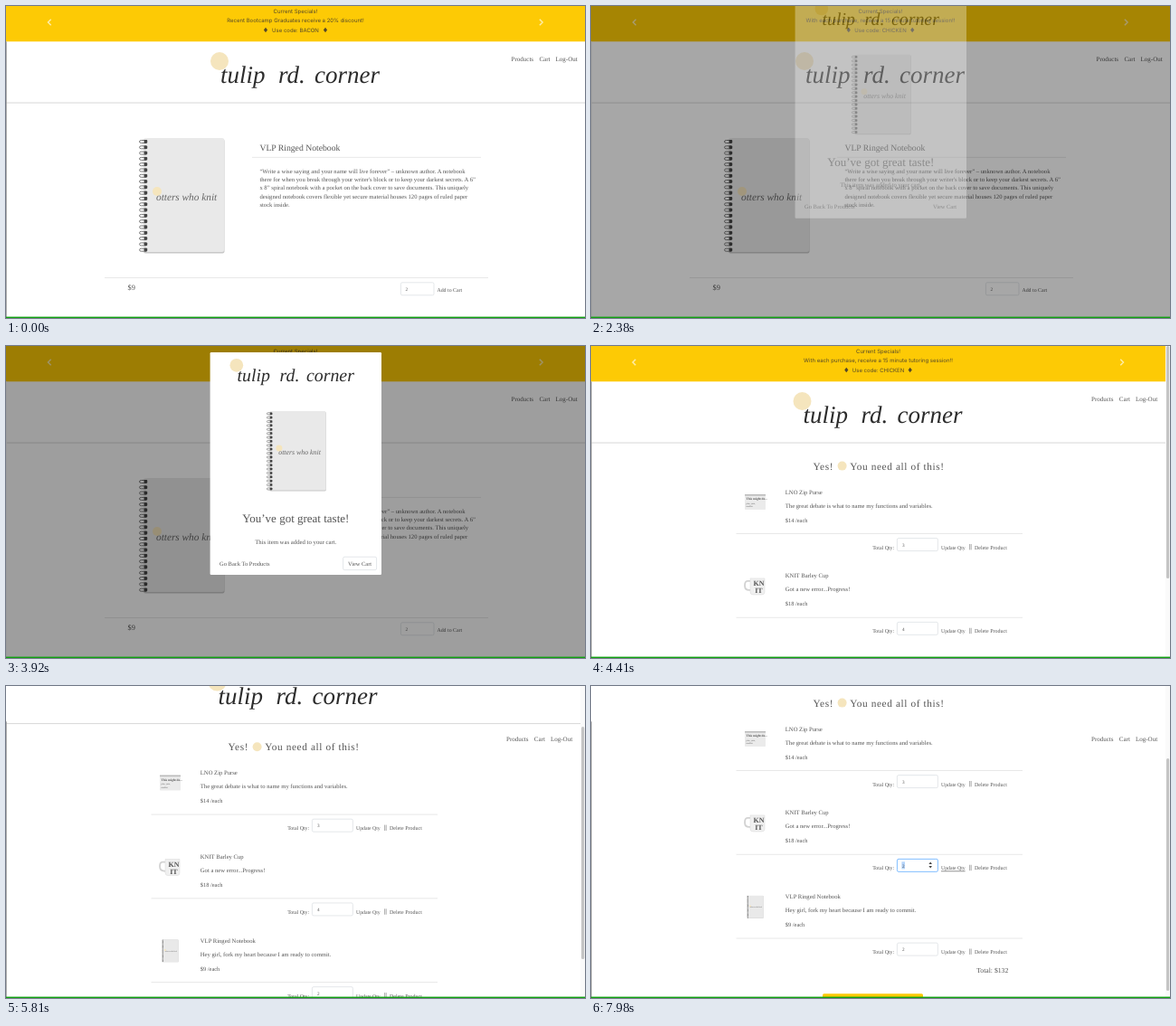
Write an HTML page that moves like this. It is 640 by 345 pixels and loops after 8000 ms.

```html
<!DOCTYPE html>
<html lang="en">
<head>
<meta charset="utf-8">
<title>Shop walkthrough</title>
<style>
  html, body { margin: 0; width: 100%; height: 100%; overflow: hidden; background: #fff; }
  svg { display: block; width: 100vw; height: 100vh; }
  text { font-family: "Liberation Serif", serif; fill: #555; text-rendering: geometricPrecision; white-space: pre; }
  .sans text { font-family: Inter, sans-serif; font-size: 6px; fill: #54482a; text-anchor: middle; }
  .script { font-style: italic; fill: #2c2c2c; }
  .soft { font-style: italic; fill: #666; }
  .mid { text-anchor: middle; }
  .rule { stroke: #e2e2e2; stroke-width: .8; }
  .field { fill: #fff; stroke: #d9dde1; stroke-width: .7; }
  .focus { stroke: #80bdff; stroke-width: 1; }
  .chevron { fill: none; stroke: #fff; stroke-width: 1.5; opacity: .65; }
</style>
</head>
<body>
<svg id="stage" viewBox="0 0 640 345" preserveAspectRatio="none"></svg>
<script>
const LOOP = 8000;
const GOLD = "#fdca05";
const CREST = "#f5e5bd";

const clamp = v => Math.max(0, Math.min(1, v));
const span = (t, from, to) => clamp((t - from) / (to - from));
const smooth = p => p * p * (3 - 2 * p);
const easeOut = p => 1 - (1 - p) ** 2;

const label = (x, y, size, str, extra = "") =>
  `<text x="${x}" y="${y}" font-size="${size}" ${extra}>${str}</text>`;
const rule = (x1, x2, y) => `<line class="rule" x1="${x1}" x2="${x2}" y1="${y}" y2="${y}"/>`;
const underline = (id, x1, x2, y) =>
  `<line id="${id}" x1="${x1}" x2="${x2}" y1="${y}" y2="${y}" stroke="#444" stroke-width=".6"/>`;
const field = (x, y, w, h, id = "") =>
  `<rect ${id && `id="${id}"`} class="field" x="${x}" y="${y}" width="${w}" height="${h}" rx="1.6"/>`;
const spinner = (id, x, y) =>
  `<path id="${id}" d="M${x - 1.8} ${y - 1}l1.8-2.6 1.8 2.6zM${x - 1.8} ${y + 1}l1.8 2.6 1.8-2.6z" fill="#444"/>`;
const group = (x, y, scale, body) =>
  `<g transform="translate(${x} ${y}) scale(${scale})">${body}</g>`;

// Shop name with its round emblem, laid out from the emblem's corner
const shopName = () => `
  <circle cx="12" cy="12" r="10" fill="${CREST}"/>
  ${label(13, 36, 27, "tulip", 'class="script"')}
  ${label(77, 36, 27, "rd.", 'class="script"')}
  ${label(117, 36, 27, "corner", 'class="script"')}`;

function notebook() {
  let rings = "";
  for (let i = 0; i < 20; i++) {
    const y = 2.5 + i * 6.3;
    rings += `<path d="M8 ${y}H2.5q-2 0-2 1.5t2 1.5H8" fill="none" stroke="#777" stroke-width="1"/>
      <rect x="5.6" y="${y - .4}" width="3.6" height="3.6" rx=".8" fill="#444"/>`;
  }
  return `
    <rect x="5" y="1" width="89.5" height="126.5" rx="2" fill="#c8c8c8"/>
    <rect x="5" width="89" height="126" rx="2" fill="#e9e9e9"/>
    ${rings}
    <circle cx="20" cy="59" r="5" fill="${CREST}"/>
    ${label(19, 69, 11.3, "otters who knit", 'class="soft"')}`;
}

const pouch = () => `
  <rect width="23" height="17" rx=".8" fill="#ebebeb"/>
  <rect width="23" height="1.6" fill="#bbb"/>
  ${label(1.5, 6, 3.5, "This might do...", 'font-weight="bold"')}
  ${label(1.5, 10.5, 2.4, "pins, yarn,")}
  ${label(1.5, 14, 2.4, "needles")}`;

const cup = () => `
  <path d="M8 4H4Q1 4 1 9t5 5h2" fill="none" stroke="#d2d2d2" stroke-width="1.8"/>
  <path d="M7 1h16v15q0 3-3 3H10q-3 0-3-3z" fill="#f0f0f0" stroke="#d9d9d9" stroke-width=".5"/>
  ${label(10.6, 9.3, 8, "KN", 'font-weight="bold"')}
  ${label(12.2, 17, 8, "IT", 'font-weight="bold"')}`;

const offer = (cx, text, code, gap) => {
  const gem = x => `<path d="M${x} 23.7l2.1 2.8-2.1 2.8-2.1-2.8z" fill="#54482a"/>`;
  return `<text x="${cx}" y="8">Current Specials!</text>
    <text x="${cx}" y="18.2">${text}</text>
    <text x="${cx}" y="28.6">Use code: ${code}</text>${gem(cx - gap)}${gem(cx + gap)}`;
};
const discount = cx => offer(cx, "Recent Bootcamp Graduates receive a 20% discount!", "BACON", 33);
const tutoring = cx => offer(cx, "With each purchase, receive a 15 minute tutoring session!!", "CHICKEN", 35.2);

const header = (width, slides, logoX) => `
  <rect width="${width}" height="39.3" fill="${GOLD}"/>
  <g class="sans" clip-path="url(#slideArea)">${slides}</g>
  <path class="chevron" d="M${width * .075 + 1.7} 14.8l-3.2 3.2 3.2 3.2M${width * .924 - 1.5} 14.8l3.2 3.2-3.2 3.2"/>
  <rect y="106.6" width="${width}" height=".9" fill="#d3d3d3"/>
  ${group(logoX, 49, 1, shopName())}`;

const nav = x => label(x, 60.6, 7, "Products") + label(x + 30.8, 60.6, 7, "Cart") + label(x + 49, 60.6, 7, "Log-Out");

const story = [
  "“Write a wise saying and your name will live forever” – unknown author. A notebook",
  "there for when you break through your writer's block or to keep your darkest secrets. A 6”",
  "x 8” spiral notebook with a pocket on the back cover to save documents. This uniquely",
  "designed notebook covers flexible yet secure material houses 120 pages of ruled paper",
  "stock inside."
];

const productPage = () => `
  ${header(640, `<g id="slides">${discount(320)}<g transform="translate(640)">${tutoring(320)}</g></g>`, 224)}
  ${nav(558.6)}
  ${group(147, 146, 1, notebook())}
  ${label(280.4, 159.8, 9.7, "VLP Ringed Notebook")}
  ${rule(272, 525, 167.4)}
  ${story.map((s, i) => label(280.4, 185.2 + i * 9.1, 6.65, s)).join("")}
  ${rule(109, 533, 300.5)}
  ${label(134.5, 314, 8.3, "$9")}
  ${field(436.4, 305.8, 36.6, 14)}
  ${label(441.4, 315, 5.2, "2")}
  ${spinner("buySpin", 465.5, 313)}
  <rect id="buyCaret" x="444.3" y="308.5" width=".7" height="8.5" fill="#333"/>
  ${label(476.4, 316.3, 5.9, "Add to Cart")}
  ${underline("buyLine", 476.4, 504, 317.8)}`;

const modal = () => `
  <rect x="225.6" width="189.4" height="246" rx="1.2" fill="#fff"/>
  ${group(246, 5.5, .735, shopName())}
  ${group(288, 65, .695, notebook())}
  ${label(320.3, 188.4, 13, "You’ve got great taste!", 'class="mid"')}
  ${label(320.3, 211.7, 6.75, "This item was added to your cart.", 'class="mid"')}
  ${label(236, 235.6, 6.5, "Go Back To Products")}
  <rect id="viewButton" class="field" x="372.6" y="226.2" width="37" height="14.4" rx="1.6"/>
  ${label(378, 235.6, 6.4, "View Cart")}`;

const items = [
  { name: "LNO Zip Purse", note: "The great debate is what to name my functions and variables.", price: 14, qty: 3, pic: group(170, 164, 1, pouch()) },
  { name: "KNIT Barley Cup", note: "Got a new error...Progress!", price: 18, qty: 4, pic: group(169, 163.2, 1, cup()) },
  { name: "VLP Ringed Notebook", note: "Hey girl, fork my heart because I am ready to commit.", price: 9, qty: 2, pic: group(172, 160.3, .196, notebook()) }
];

const cartRow = (item, i) => `<g transform="translate(0 ${i * 92.75})">
  ${item.pic}
  ${label(214.8, 163.6, 6.65, item.name)}
  ${label(214.8, 178.7, 6.65, item.note)}
  ${label(214.8, 194.6, 6.4, `$${item.price} /each`)}
  ${rule(160.5, 477, 207.5)}
  ${label(311.2, 224.6, 5.9, "Total Qty:")}
  ${field(338.4, 212.6, 45, 14, "field" + i)}
  <rect id="mark${i}" x="343.4" y="215.6" width="3.6" height="8" fill="#b5d5fb" visibility="hidden"/>
  ${label(344, 221.8, 5.2, item.qty, `id="qty${i}"`)}
  ${label(387, 224.6, 5.75, "Update Qty")}
  <path d="M418.6 219v6.4M420.2 219v6.4" stroke="#999" stroke-width=".8"/>
  ${label(424, 224.6, 6, "Delete Product")}</g>`;

const cartPage = () => `
  <g id="cartBody">
    ${header(635, tutoring(317.5), 221.5)}
    ${label(245.4, 136.6, 11.3, "Yes!", 'letter-spacing=".6"')}
    <circle cx="277.6" cy="132.6" r="5" fill="${CREST}"/>
    ${label(286.2, 136.6, 11.3, "You need all of this!", 'letter-spacing=".6"')}
    ${items.map(cartRow).join("")}
    ${spinner("qtySpin", 375.2, 312)}
    ${underline("updateLine", 387, 413.6, 318.8)}
    ${label(426.2, 431, 7.7, "Total: $132")}
    <rect x="256" y="454.3" width="111" height="16" rx="1.5" fill="${GOLD}"/>
  </g>
  ${nav(553)}
  <rect x="635" width="5" height="345" fill="#fafafa"/>
  <rect id="thumb" x="636" width="3.2" height="257" rx="1.6" fill="#c4c4c4"/>`;

const stage = document.getElementById("stage");
stage.innerHTML = `
  <clipPath id="slideArea"><rect x="30" width="578" height="39"/></clipPath>
  <rect width="640" height="345" fill="#fff"/>
  <g id="product">${productPage()}</g>
  <rect id="shade" width="640" height="345"/>
  <g id="modal">${modal()}</g>
  <g id="cart">${cartPage()}</g>
  <rect y="39.3" width=".8" height="305" fill="#999"/>
  <rect y="343.6" width="640" height="1.4" fill="#10a010"/>`;

const el = {};
stage.querySelectorAll("[id]").forEach(node => el[node.id] = node);
const show = (node, on) => node.style.display = on ? "" : "none";
const shift = (node, x, y) => node.setAttribute("transform", `translate(${x} ${y})`);

function scrollAt(t) {
  return 18 * smooth(span(t, 4930, 5110))
    + 42 * smooth(span(t, 5270, 5460))
    + 54 * smooth(span(t, 5760, 6020));
}

function render(t) {
  const inCart = t >= 3990;
  show(el.product, !inCart);
  show(el.cart, inCart);

  shift(el.slides, -640 * smooth(span(t, 520, 1300) ** .8), 0);
  show(el.buySpin, t >= 1400 && t < 1680);
  show(el.buyLine, t >= 1680 && t < 2240);
  show(el.buyCaret, t >= 2100 && t < 2240);

  const open = !inCart && t >= 2240;
  show(el.shade, open);
  show(el.modal, open);
  el.shade.setAttribute("opacity", .38 * span(t, 2200, 2400));
  el.modal.setAttribute("opacity", span(t, 2330, 2490));
  shift(el.modal, 0, 7 - 22 * (1 - easeOut(span(t, 2350, 2710))));
  show(el.viewButton, t >= 3850);

  const scroll = scrollAt(t);
  shift(el.cartBody, 0, -scroll);
  el.thumb.setAttribute("y", Math.max(0, scroll * .72 - 2));

  show(el.qtySpin, (t >= 6720 && t < 6930) || t >= 7210);
  el.qty1.textContent = t < 7210 ? 4 : t < 7630 ? 3 : 2;
  el.field1.classList.toggle("focus", t >= 7350);
  el.mark1.setAttribute("visibility", t >= 7350 ? "visible" : "hidden");
  show(el.updateLine, t >= 7980);
}

const start = performance.now();
function tick() {
  render((performance.now() - start) % LOOP);
  requestAnimationFrame(tick);
}
tick();
</script>
</body>
</html>
```
